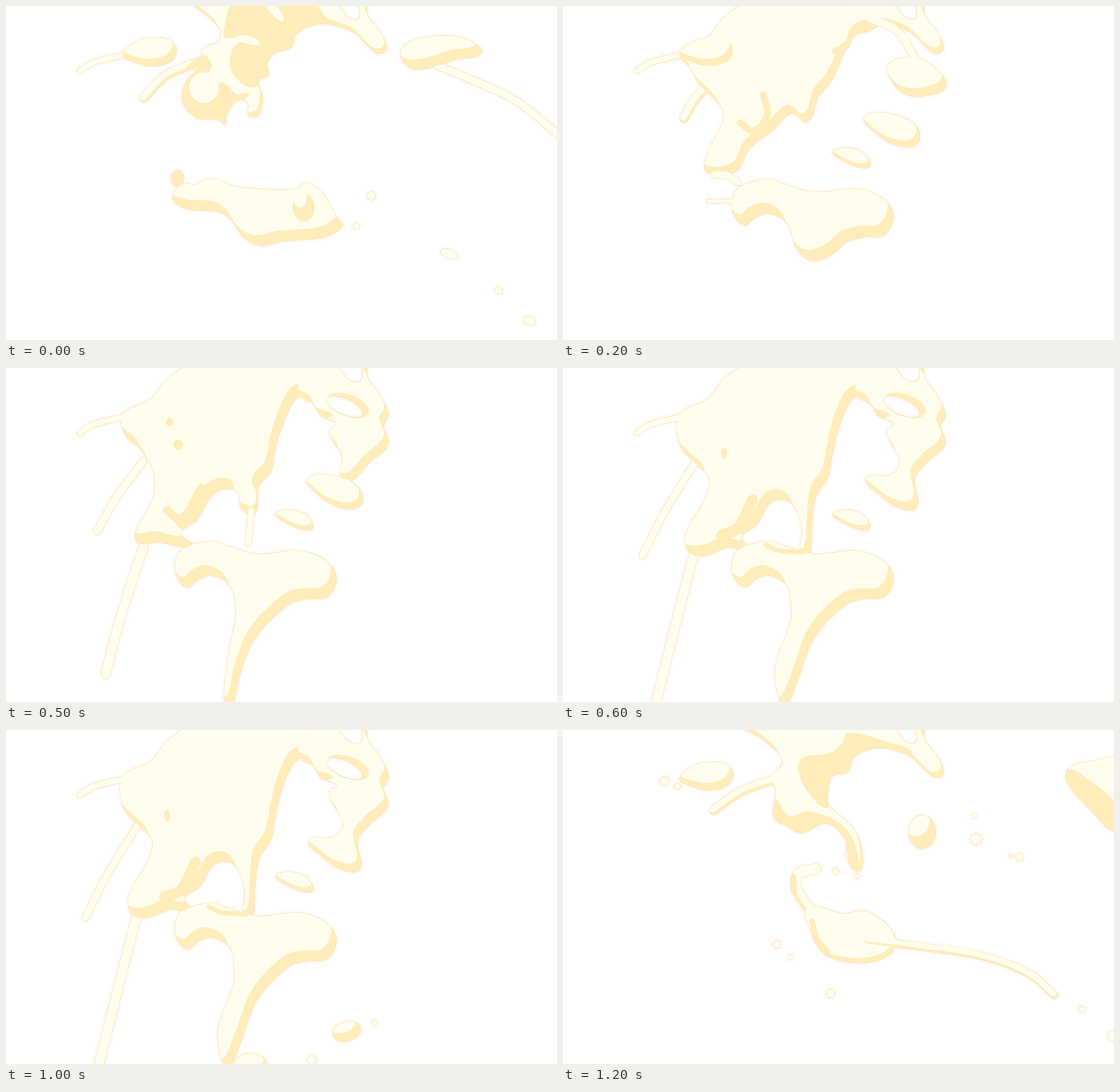
Write an HTML page with a canvas that moves like this. It is 896 by 544 pixels and loops after 1.3 s.

```html
<!DOCTYPE html>
<html lang="en">
<head>
<meta charset="utf-8">
<title>Cream splash</title>
<style>
html, body { margin: 0; width: 896px; height: 544px; overflow: hidden; background: #fff; }
canvas { display: block; }
</style>
</head>
<body>
<canvas id="stage" width="896" height="544"></canvas>
<script>
const ctx = document.getElementById('stage').getContext('2d');
const LIGHT = '#fffeee', SHADE = '#feedbb';
let edges = [];

// Smooth curve through "x,y x,y ..." points.
function curve(text, closed) {
  const pts = text.trim().split(/\s+/).map(s => s.split(',').map(Number));
  const n = pts.length;
  const at = i => closed ? pts[(i + n) % n] : pts[Math.max(0, Math.min(n - 1, i))];
  const handle = (i, reach) => {
    const [ax, ay] = at(i - 1), [bx, by] = at(i + 1);
    const k = reach / 3 / (Math.hypot(bx - ax, by - ay) || 1);
    return [at(i)[0] + (bx - ax) * k, at(i)[1] + (by - ay) * k];
  };
  const path = new Path2D();
  path.moveTo(...pts[0]);
  for (let i = 0; i < (closed ? n : n - 1); i++) {
    const [x, y] = at(i + 1), len = Math.hypot(x - at(i)[0], y - at(i)[1]);
    path.bezierCurveTo(...handle(i, len), ...handle(i + 1, -len), x, y);
  }
  return path;
}

function oval(x, y, rx, ry, turn = 0) {
  const path = new Path2D();
  path.ellipse(x, y, rx, ry, turn, 0, 7);
  return path;
}

// A width means a stroked line, no width a filled shape.
function paint(path, width, mode, color) {
  ctx.globalCompositeOperation = mode;
  ctx.fillStyle = ctx.strokeStyle = color;
  ctx.lineWidth = width;
  if (width) ctx.stroke(path);
  else ctx.fill(path);
}

// The light copy sits up and left of the shape and leaves a shaded rim.
function pour(path, width, rim) {
  paint(path, width, 'source-over', SHADE);
  ctx.save();
  if (!width) ctx.clip(path);
  ctx.translate(-rim * .5, -rim);
  paint(path, width, 'source-atop', LIGHT);
  ctx.restore();
  edges.push([path, width]);
}
const body = (text, rim = 0) => pour(curve(text, true), 0, rim);
const strand = (text, width, rim = 0) => pour(curve(text), width, rim);
const blob = (rim, ...shape) => pour(oval(...shape), 0, rim);
const drops = (...list) => list.forEach(([x, y, r]) => blob(0, x, y, r, r));

const shade = text => paint(curve(text, true), 0, 'source-atop', SHADE);
const streak = (text, width) => paint(curve(text), width, 'source-atop', SHADE);
const spot = (color, ...shape) => paint(oval(...shape), 0, 'source-atop', color);

function hole(...shape) {
  const path = oval(...shape);
  paint(path, 0, 'destination-out', '#000');
  edges.push([path, 0]);
}

// Thin rim with a dotted halo, laid behind the fills.
function outline() {
  for (const [color, extra, dash] of [['#fbe2bd', 2, []], ['#fff', 5, []], ['#f6d8cc', 7, [1, 3]]]) {
    ctx.lineCap = dash.length ? 'butt' : 'round';
    ctx.setLineDash(dash);
    edges.forEach(([path, width]) => paint(path, width + extra, 'destination-over', color));
  }
  ctx.lineCap = 'round';
  ctx.setLineDash([]);
}

// Shared contours
const ARM = ' 438,76 463,68 472,46 490,34 520,29 565,43 602,76 618,72 612,48 588,15 586,-8 575,-8 574,20 557,19 530,-8';
const LEFT = '310,-8 265,15 236,50 190,76 ';
const INNER = ' 448,98 464,60 478,46 500,40 540,6 528,-8';
const BROW = '276,335 280,302 303,288 335,282 360,290 408,303 480,298 525,318 537,345 522,373 490,376 ';
const CHEEK = ' 365,355 335,338 312,345 295,357';

const chin = (text, rim) => body(BROW + text + CHEEK, rim);
const tail = () => strand('120,106 142,92 200,78', 9);
const pear = () => body('190,80 210,59 240,52 268,57 277,74 265,92 235,98 205,90', 12);

function cluster() {
  strand('500,20 545,42 575,90', 12);
  body('530,95 575,84 612,108 623,130 605,143 560,145 533,120', 14);
}

function sideTear() {
  body('440,236 480,235 500,258 487,264 455,252', 8);
}

function tears() {
  body('491,180 540,177 577,200 574,226 540,226 508,207', 11);
  sideTear();
}

function noseThreads() {
  strand('246,275 266,276 284,287', 11);
  strand('236,318 285,318', 6);
}

// Right-hand mass with its slit; the bottom differs as it sags.
function rightMass(bottom, gap) {
  body('480,46 500,58 512,78 538,90 527,100 533,122 ' + bottom + ' 621,125 614,95 622,75 605,40 588,15 586,-8 580,-8 577,20 557,19 530,-8 480,10', 14);
  spot(SHADE, 556, 61, gap + 4, 18, .35);
  hole(550, 63, gap, 13, .42);
}

const flyer = (x, y) => blob(15, x, y, 25, 18);

// Poses
function burst() {
  strand('224,150 262,112 318,90', 14, 4);
  body('300,-8 320,10 348,38 345,58 320,70 318,94 292,125 288,158 310,182 345,185 356,192 358,178 378,153 393,157 395,178 411,177 417,148 411,122 427,112 424,95' + ARM, 8);
  shade('372,-6 355,35 357,52 390,48 411,62 378,60 364,85 370,112 400,133 424,115 440,76 463,68 490,34 565,43 520,18 500,-6');
  spot(LIGHT, 437, 8, 7, 21, -.7);
  shade('285,180 285,115 318,80 334,94 330,120 356,126 375,143 396,143 385,152 358,200');
  spot(LIGHT, 322, 133, 24, 25);
  tail();
  pear();
  strand('700,97 750,117 830,155 905,215', 12);
  body('642,82 650,62 690,50 740,51 773,70 768,81 728,88 700,98 660,102', 16);
  blob(40, 279, 281, 10, 13);
  body('272,315 285,290 308,291 330,281 375,294 410,298 472,298 488,288 515,306 538,345 547,358 516,377 450,383 412,390 385,375 365,347 345,335 297,331', 17);
  spot(SHADE, 484, 328, 18, 23);
  spot(LIGHT, 478, 312, 11, 16);
  drops([594, 309, 7], [570, 358, 5], [801, 463, 6]);
  blob(0, 721, 404, 15, 7, .4);
  blob(0, 851, 513, 10, 7, .3);
}

function spread() {
  strand('216,152 250,122 295,92', 16, 4);
  body('305,-8 319,30 300,60 287,92 305,118 275,165 260,215 268,221 280,206 320,211 336,185 382,166 396,172 397,194 411,192 418,155 413,120 425,104' + ARM, 12);
  shade('378,-5 356,36 400,25 442,30 435,-5');
  streak('368,52 336,75 338,118 375,143 412,140 412,110', 18);
  streak('398,78 418,55 445,35', 9);
  streak('322,133 338,160 325,192', 14);
  strand('425,88 460,132 520,161 628,190', 12, 4);
  cluster();
  tail();
  pear();
  body('692,206 700,200 790,202 850,216 905,236 905,254 830,224 770,225 730,212', 9);
  noseThreads();
  chin('455,382 435,400 410,404 385,380', 16);
  blob(14, 440, 449, 19, 34, .2);
  drops([662, 202, 7], [524, 420, 6], [577, 399, 4], [601, 387, 5], [679, 434, 6], [762, 484, 4], [813, 528, 7]);
}

function sagTop() {
  tail();
  strand('197,183 215,152 240,125', 14, 4);
  body(LEFT + '208,102 222,128 245,150 262,178 235,240 234,270 280,270 303,232 338,205 372,175 398,188 415,148 434,125' + INNER, 14);
  streak('288,190 310,203 332,178 326,145', 11);
}

function swell() {
  sagTop();
  pear();
  body('470,-8' + ARM, 10);
  cluster();
  tears();
  noseThreads();
  chin('460,385 440,403 405,415 380,395', 18);
}

function sag() {
  sagTop();
  strand('401,180 401,255', 8);
  spot(SHADE, 380, 9, 28, 5);
  spot(SHADE, 310, 37, 18, 5, -.3);
  spot(SHADE, 281, 78, 5, 12);
  spot(SHADE, 285, 124, 12, 17);
  hole(279, 129, 10, 15);
  rightMass('548,140 555,162 570,166 600,146', 44);
  tears();
  noseThreads();
  chin('460,385 430,422 400,426 378,408 375,385', 20);
  drops([417, 295, 5], [554, 341, 16], [701, 302, 6], [806, 296, 10]);
}

function stretch(long) {
  tail();
  strand(long ? '224,290 185,410 162,498' : '224,285 205,350', 15);
  strand(long ? '223,152 180,210 148,266' : '223,152 185,205', 12);
  body(LEFT + '195,110 217,130 240,170 238,215 213,262 215,285 250,284 305,290 284,270 310,248 340,203 375,200 382,228 404,238 411,192 430,170 438,130' + INNER, 18);
  strand('399,232 394,286', 9);
  streak('262,232 285,245 318,195', 14);
  spot(SHADE, 266, 88, 6, 7);
  spot(SHADE, 280, 125, 8, 9);
  spot(LIGHT, 397, 208, 10, 18);
  rightMass('546,138 545,180 562,184 590,155', 32);
  tears();
  if (long) chin('460,385 405,440 380,500 368,550 355,550 363,460 374,400', 17);
  else chin('460,387 412,445 385,475 374,430 375,390', 18);
}

function drip() {
  tail();
  strand('212,305 185,410 150,550', 15);
  strand('214,155 165,235 129,306', 11);
  body(LEFT + '190,125 212,152 238,180 230,215 200,270 205,300 230,306 268,292 300,295 290,275 315,255 340,218 370,219 388,258 386,305 400,308 405,255 411,210 430,180 438,140' + INNER, 17);
  streak('258,272 285,260 308,215', 18);
  spot(SHADE, 262, 139, 5, 10);
  rightMass('547,145 547,160 530,175 493,180 515,207 545,227 575,227 572,180 590,155', 32);
  sideTear();
  chin('460,385 408,440 383,505 364,550 355,550 345,490 370,415 371,385', 17);
  streak('330,288 350,297 390,300', 8);
}

function landing() {
  drip();
  blob(18, 557, 209, 25, 37);
  flyer(743, 267);
  drops([608, 175, 5], [616, 246, 6], [688, 268, 4], [796, 271, 8]);
}

function falling() {
  drip();
  blob(14, 554, 491, 23, 16, -.3);
  blob(10, 398, 545, 26, 18);
  drops([599, 477, 4], [497, 537, 7]);
}

function impact() {
  strand('245,131 290,100 345,80', 14, 4);
  body('290,-8 325,15 357,50 340,76 346,98 343,143 365,157 388,168 430,152 460,180 461,205 480,230 487,200 472,160 432,122 431,100' + ARM, 9);
  shade('390,45 432,38 455,20 462,5 510,14 565,43 490,34 463,68 438,76 433,125 405,110 382,65');
  shade('340,112 368,140 400,132 460,160 482,220 470,230 455,175 425,155 388,170 340,165');
  pear();
  body('818,80 825,60 860,51 905,50 905,160 850,122');
  shade('815,66 860,85 905,130 905,170 815,110');
  blob(20, 584, 166, 22, 27);
  strand('411,226 383,235 380,258 405,298', 17);
  streak('374,238 378,272 400,302', 9);
  body('398,290 455,299 495,296 538,332 535,362 505,377 465,378 425,365 404,330', 8);
  streak('405,312 412,340 430,362', 10);
  strand('495,342 575,352 680,368 760,398 799,432', 12, 4);
  drops([165, 83, 7], [186, 92, 5], [669, 139, 4], [672, 178, 9], [728, 205, 3], [742, 207, 6], [443, 230, 5], [478, 238, 4],
    [348, 349, 6], [370, 370, 4], [435, 429, 7], [844, 455, 5], [894, 498, 8]);
}

const poses = [
  burst, spread, swell, sag,
  () => stretch(false), () => stretch(true),
  drip,
  () => { drip(); flyer(838, 207); },
  landing,
  () => { drip(); flyer(660, 365); },
  falling, drip, impact
];

let shown = -1;
ctx.lineCap = 'round';
function tick() {
  const step = Math.floor(performance.now() % 1300 / 100);
  if (step !== shown) {
    shown = step;
    edges = [];
    ctx.clearRect(0, 0, 896, 544);
    poses[step]();
    outline();
  }
  requestAnimationFrame(tick);
}
tick();
</script>
</body>
</html>
```
